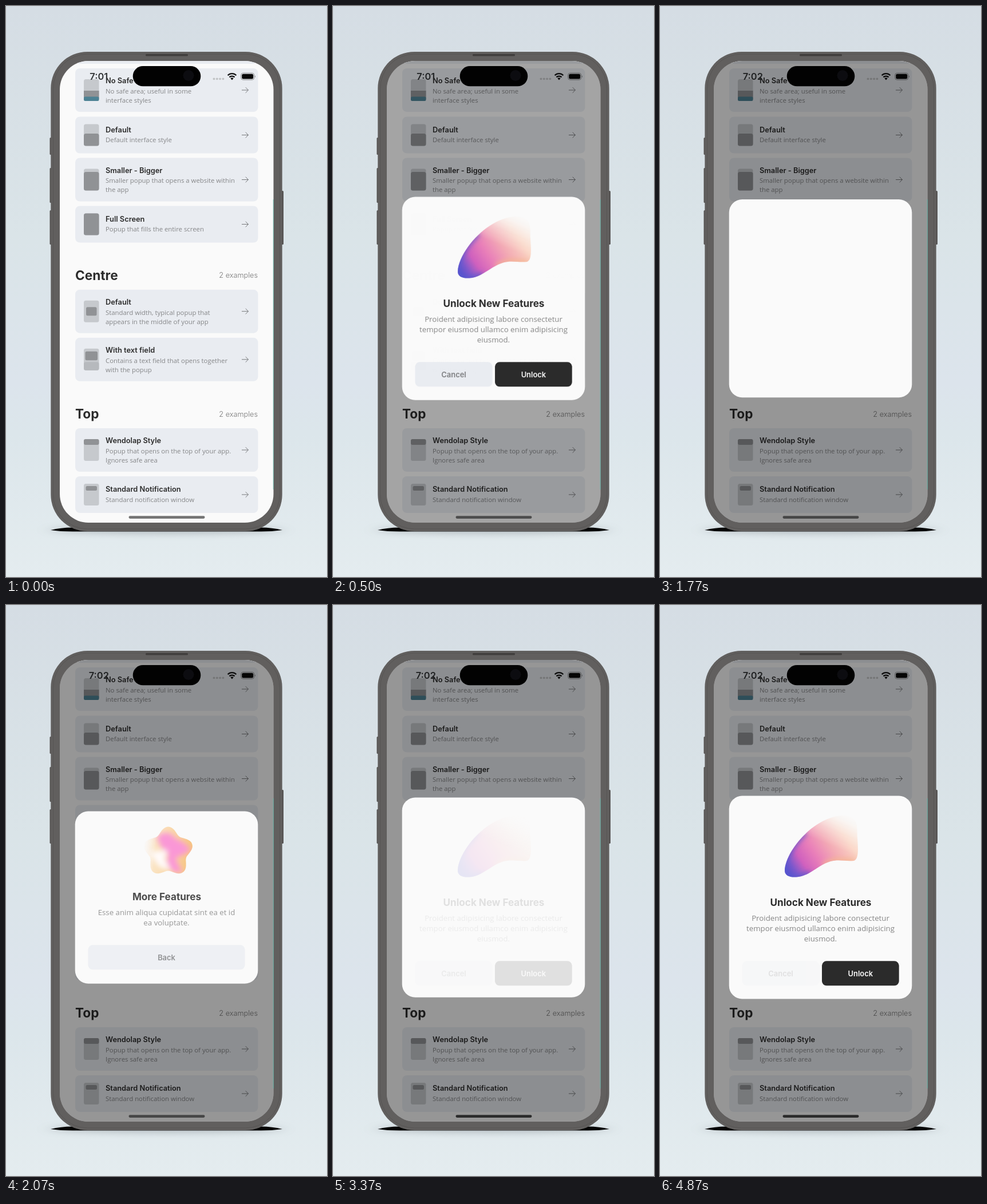
Animation, 561 px wide and 998 px high, one loop 5030 ms. Source, as an HTML page:

```html
<!DOCTYPE html>
<html lang="en">
<head>
<meta charset="utf-8">
<title>Popup demo</title>
<style>
  html, body { margin: 0; height: 100%; overflow: hidden; background: #dce5ea; }
  svg { display: block; width: 100vw; height: 100vh; }
  text { font-family: Inter, sans-serif; }
  .body { font-family: "Open Sans", sans-serif; }
</style>
</head>
<body>
<svg id="stage" viewBox="0 0 561 998"></svg>
<script>
const INK = '#2c2c2c', CARD = '#e9ecf1', PAPER = '#fafafa', LIGHT = '#c6c9cd', DARK = '#909295';

const rect = (x, y, w, h, r, fill, extra = '') =>
  `<rect x="${x}" y="${y}" width="${w}" height="${h}" rx="${r}" fill="${fill}" ${extra}/>`;
const text = (x, y, str, size, weight, fill, anchor = 'start', extra = '') =>
  `<text x="${x}" y="${y}" font-size="${size}" font-weight="${weight}" fill="${fill}" text-anchor="${anchor}" ${extra}>${str}</text>`;
const bodyText = (x, y, lines, size, step, fill, anchor) =>
  lines.map((s, i) => text(x, y + i * step, s, size, 400, fill, anchor, 'class="body"')).join('');
const stops = list => list.map(([o, c, a = 1]) =>
  `<stop offset="${o}" stop-color="${c}" stop-opacity="${a}"/>`).join('');
const linear = (id, x1, y1, x2, y2, list) =>
  `<linearGradient id="${id}" gradientUnits="userSpaceOnUse" x1="${x1}" y1="${y1}" x2="${x2}" y2="${y2}">${stops(list)}</linearGradient>`;

// A list row; each part of its icon is [dx, dy, w, h, radius, colour].
function row(y, title, lines, parts) {
  const h = lines.length > 1 ? 76 : 64, mid = y + h / 2, top = mid - 19;
  const base = y + (h > 64 ? 26.3 : 27.3);
  return rect(121, y, 319.5, h, 8, CARD)
    + rect(136, top, 26.5, 38, 3.5, LIGHT)
    + parts.map(([dx, dy, w, ph, r, c]) => rect(136 + dx, top + dy, w, ph, r, c)).join('')
    + text(174, base, title, 12.8, 600, INK)
    + bodyText(174, base + 17.6, lines, 11.36, 15.9, '#858688')
    + `<path d="M412 ${mid}h11.5m-4.8-4.8l4.8 4.8l-4.8 4.8" fill="none" stroke="#77797b"/>`;
}
const heading = (y, str) => text(121, y, str, 22.6, 700, INK)
  + text(440, y - 3.5, '2 examples', 12.7, 300, '#777', 'end');

const button = (id, x, y, w, label, fill, ink) => `<g id="${id}">`
  + rect(x, y, w, 43, 8, fill) + text(x + w / 2, y + 26.8, label, 12.9, 600, ink, 'middle') + '</g>';

const starPath = 'M' + Array.from({ length: 90 }, (_, i) => {
  const a = i * Math.PI / 45, r = 38.5 + 5.5 * Math.cos(5 * a);
  return `${(283.5 + r * Math.sin(a)).toFixed(1)} ${(431.5 - r * Math.cos(a)).toFixed(1)}`;
}).join('L') + 'Z';
const blobPath = 'M218 464C219 438 246 402 274 384C294 371 318 364 332 370C347 376 344 390 345 407C346 424 348 444 339 447C318 449 306 440 279 457C263 467 253 475 238 475.5C226 476 218 473 218 464Z';

const defs = `<defs>
  ${linear('wall', 0, 0, 0, 998, [[0, '#d5dde4'], [.4, '#dae4e8'], [.66, '#dce4ec'], [.75, '#dce6eb'], [1, '#e4ecef']])}
  ${linear('blobFill', 226, 472, 346, 392, [[0, '#5551cd'], [.09, '#7d58cc'], [.22, '#d061be'], [.4, '#e97fb9'], [.6, '#f3aab5'], [.82, '#fad3c2'], [1, '#fae6d6']])}
  ${linear('blobFade', 322, 362, 298, 420, [[0, '#000'], [.2, '#222'], [.6, '#aaa'], [1, '#fff']])}
  ${linear('starFill', 240, 425, 326, 435, [[0, '#fbe9d8', 0], [.25, '#fadfb8'], [.6, '#f8cf95'], [1, '#f5b864']])}
  <clipPath id="screen"><rect x="94" y="96" width="373.5" height="807" rx="50"/></clipPath>
  <clipPath id="blobClip"><path d="${blobPath}"/></clipPath>
  <clipPath id="starClip"><path d="${starPath}"/></clipPath>
  <mask id="blobMask"><rect x="200" y="350" width="170" height="140" fill="url(#blobFade)"/></mask>
  <filter id="soft" x="-50%" y="-50%" width="200%" height="200%"><feGaussianBlur stdDeviation="5"/></filter>
  <filter id="shade" x="-20%" y="-300%" width="140%" height="700%"><feGaussianBlur stdDeviation="14 6"/></filter>
</defs>`;

const phone = `<rect width="561" height="998" fill="url(#wall)"/>
  <ellipse cx="280" cy="916" rx="205" ry="7" fill="#6d747a" opacity=".35" filter="url(#shade)"/>
  <path d="M78 916Q96 911.5 116 911.5H446Q465 911.5 483 916Q465 918.5 446 918.5H116Q94 918.5 78 916Z" fill="#050505"/>`
  + [[76.5, 230, 30], [76.5, 283, 61], [76.5, 357, 60], [481, 323, 94]].map(([x, y, h]) => rect(x, y, 4, h, 1.5, '#565453')).join('')
  + rect(78.3, 80, 404.4, 838, 64, '#615f5e')
  + rect(82.5, 84, 396, 830, 60, 'none', 'stroke="#575554"')
  + rect(244, 84, 74, 3.5, 1.5, '#403e3d');

const status = [362.5, 367.8, 373.1, 378.4].map(x => `<circle cx="${x + 1}" cy="127.3" r="1.9" fill="#c0c2c4"/>`).join('')
  + `<g fill="none" stroke="#151515" stroke-width="2.3"><path d="M387.6 121.2a10.6 10.6 0 0 1 14.8 0"/><path d="M390.4 124.4a6.6 6.6 0 0 1 9.2 0"/></g>
  <path d="M392.4 126.6a3.7 3.7 0 0 1 5.2 0L395 129.4Z" fill="#151515"/>`
  + rect(410.6, 117.2, 23.2, 11.9, 3.8, 'none', 'stroke="#8d8f91"') + rect(412.2, 118.8, 20, 8.8, 2.5, '#080808')
  + `<path d="M435 121.2q2 2 0 4Z" fill="#8d8f91"/>`;

const list = rect(121, 80, 319.5, 21, 8, CARD)
  + row(109, 'No Safe', ['No safe area; useful in some', 'interface styles'],
      [[0, 20, 26.5, 14, 0, DARK], [0, 30.5, 26.5, 7.5, 2.5, '#4d8294']])
  + row(193.5, 'Default', ['Default interface style'], [[0, 16.5, 26.5, 21.5, 3.5, DARK]])
  + row(265.5, 'Smaller - Bigger', ['Smaller popup that opens a website within', 'the app'], [[0, 5.5, 26.5, 32.5, 3.5, DARK]])
  + row(349.5, 'Full Screen', ['Popup that fills the entire screen'], [[0, 0, 26.5, 38, 3.5, DARK]])
  + heading(478.5, 'Centre')
  + row(495.7, 'Default', ['Standard width, typical popup that', 'appears in the middle of your app'], [[4, 11.5, 18.5, 15, 2.5, DARK]])
  + row(579.8, 'With text field', ['Contains a text field that opens together', 'with the popup'],
      [[0, 23.5, 26.5, 14.5, 3.5, '#b6b9bd'], [2.5, 5, 21.5, 15.5, 2.5, DARK]])
  + heading(721, 'Top')
  + row(738, 'Wendolap Style', ['Popup that opens on the top of your app.', 'Ignores safe area'], [[0, 0, 26.5, 10, 3, DARK]])
  + row(822, 'Standard Notification', ['Standard notification window'], [[3.5, 4, 19.5, 8, 2.5, DARK]]);

const unlockPage = `<g id="unlockPage">
  <g mask="url(#blobMask)"><path d="${blobPath}" fill="url(#blobFill)"/>
  <g clip-path="url(#blobClip)" fill="none" stroke-width="7" filter="url(#soft)">
    <path d="M254 398C234 416 216 444 217 464C218 480 244 480 262 468" stroke="#5a58cf"/>
    <path d="M285 455C308 440 320 449 341 447" stroke="#f4b98c"/></g></g>`
  + text(281, 526, 'Unlock New Features', 17.1, 700, INK, 'middle')
  + bodyText(280.5, 551.6, ['Proident adipisicing labore consectetur', 'tempor eiusmod ullamco enim adipisicing', 'eiusmod.'], 13.27, 18.1, '#868686', 'middle')
  + button('cancel', 143.5, 622.3, 135, 'Cancel', CARD, '#7d7e80')
  + button('unlock', 283, 622.3, 134.7, 'Unlock', '#2b2b2b', '#fafafa') + '</g>';

const morePage = `<g id="morePage"><path d="${starPath}" fill="url(#starFill)"/>
  <g clip-path="url(#starClip)"><g filter="url(#soft)">
    <path d="M264 404Q284 390 296 408Q320 418 322 430L296 443L309 468L292 466Q276 450 284 436Q268 424 264 404Z" fill="#f985cf"/>
    <path d="M250 432L282 428L277 444L288 464L268 458Z" fill="#fffafa"/></g></g>`
  + text(281, 516, 'More Features', 17.1, 700, INK, 'middle')
  + bodyText(280.5, 541.8, ['Esse anim aliqua cupidatat sint ea et id', 'ea voluptate.'], 13.27, 18.1, '#868686', 'middle')
  + button('back', 143.5, 594.3, 274, 'Back', '#ebeef2', '#7d7e80') + '</g>';

stage.innerHTML = defs + phone
  + `<g clip-path="url(#screen)">${rect(90, 90, 385, 820, 0, PAPER)}${list}`
  + text(162.3, 129.2, '7:01', 16.4, 600, '#333638', 'middle', 'id="clock1"')
  + text(162.3, 129.2, '7:02', 16.4, 600, '#333638', 'middle', 'id="clock2"')
  + status + rect(214.5, 891.3, 133, 4.6, 2.3, '#757575', 'id="home"')
  + rect(90, 90, 385, 820, 0, '#000', 'id="dim"') + '</g>'
  + rect(221.7, 105, 118.6, 35.3, 17.6, '#020202') + '<circle cx="319" cy="121.5" r="9.5" fill="#0c0c10"/>'
  + '<path d="M467.2 338V845" stroke="#57b7a8" stroke-width="1" opacity=".8"/>'
  + `<g id="popup">${rect(120.7, 0, 319.6, 0, 23, PAPER, 'id="box"')}${unlockPage}${morePage}</g>`;

const $ = id => document.getElementById(id);
const fade = (id, v) => $(id).setAttribute('opacity', v);
const ramp = (t, a, b) => Math.min(1, Math.max(0, (t - a) / (b - a)));
const ease = (t, a, b) => { const x = ramp(t, a, b); return x * x * (3 - 2 * x); };
// Critically damped spring with a 0.32 s response.
const spring = (t, start) => {
  const x = Math.max(0, t - start) * 2 * Math.PI / 320;
  return 1 - (1 + x) * Math.exp(-x);
};
const OPEN = 20, NEXT = 1690, RETURN = 3130, RESIZE = 45, REVEAL = 210, LOOP = 5030;

function draw(t) {
  const shown = spring(t, OPEN), scale = 1.1 - .1 * shown;
  fade('popup', shown);
  $('popup').setAttribute('transform', `translate(281 511) scale(${scale}) translate(-281 -511)`);
  fade('dim', .4 * ease(t, 170, 600));

  const h = 355 - 54.5 * (spring(t, NEXT + RESIZE) - spring(t, RETURN + RESIZE));
  $('box').setAttribute('y', 511.1 - h / 2);
  $('box').setAttribute('height', h);

  fade('unlockPage', t < RETURN ? 1 - ramp(t, NEXT - 20, NEXT + 40) : spring(t, RETURN + REVEAL));
  fade('morePage', t < RETURN ? spring(t, NEXT + REVEAL) : 1 - ramp(t, RETURN - 20, RETURN + 40));
  fade('unlock', t >= 1430 && t < RETURN ? .2 : 1);
  fade('back', t >= 3030 ? .2 : 1);
  fade('cancel', t >= 4870 ? .2 : 1);

  const tick = ease(t, 1000, 1300);
  fade('clock1', 1 - tick);
  fade('clock2', tick);
  const g = 117 - 46 * ease(t, 3030, 3230);
  $('home').setAttribute('fill', `rgb(${g},${g},${g})`);
}

const begin = performance.now();
function frame(now) {
  draw(Math.max(0, now - begin) % LOOP);
  requestAnimationFrame(frame);
}
draw(0);
requestAnimationFrame(frame);
</script>
</body>
</html>
```
